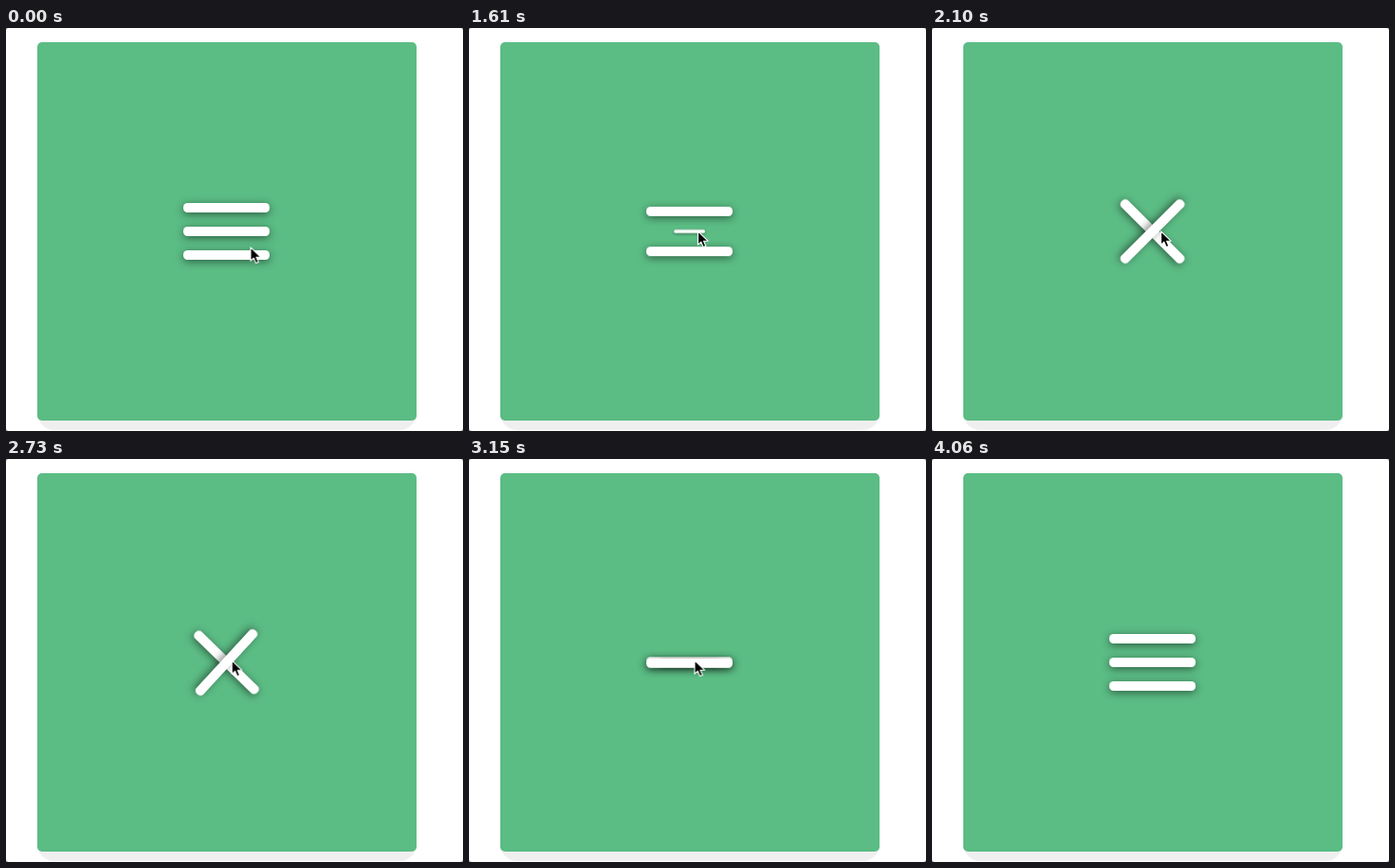
Recreate the animation shown at these times as an HTML page. Size 482 px wide and 426 px high, loop 4.27 s.

```html
<!DOCTYPE html>
<html lang="en">
<head>
<meta charset="utf-8">
<title>Menu icon</title>
<style>
  html, body { margin: 0; width: 100%; height: 100%; overflow: hidden; background: #8a8a8a; }
  .stage { position: relative; width: 482px; height: 426px; overflow: hidden; background: #fff; border-radius: 3px; }
  .stage > * { position: absolute; }
  .base { left: 32.5px; top: 385px; width: 400px; height: 40px; border-radius: 18px; background: #efefef; }
  .card { left: 32.5px; top: 15px; width: 400px; height: 400px; border-radius: 5px; background: #5bbc84; }
  .bar {
    left: 187px; width: 91px; height: 10px; border-radius: 4.5px;
    background: #fff; box-shadow: 0 2px 8px rgba(0, 0, 0, .5);
  }
  .bar, .cursor { animation: 4270ms ease-in-out infinite paused; }
  .top { top: 185px; --shift: 25px; --turn: 45deg; animation-name: cross; }
  .middle { top: 210px; animation-name: shrink; }
  .bottom { top: 235px; --shift: -25px; --turn: 135deg; animation-name: cross; }
  .cursor { left: 0; top: 0; overflow: visible; animation-name: point; }

  @keyframes cross {
    0% { transform: translateY(0) rotate(0deg); }
    34.66% { transform: translateY(0) rotate(0deg); animation-timing-function: cubic-bezier(.7, 0, .6, 1); }
    42.39% { transform: translateY(var(--shift)) rotate(0deg); }
    48.71%, 63% { transform: translateY(var(--shift)) rotate(var(--turn)); }
    72.83% { transform: translateY(var(--shift)) rotate(0deg); }
    80.21%, 100% { transform: translateY(0) rotate(0deg); }
  }
  @keyframes shrink {
    0%, 30.68% { transform: scale(1); }
    42.74% { transform: scale(0); }
    63% { transform: scale(0); animation-timing-function: cubic-bezier(.33, .3, .67, .85); }
    80.33%, 100% { transform: scale(1); }
  }
  @keyframes point {
    0% { transform: translate(257.5px, 231px); animation-timing-function: step-end; }
    22.95% { transform: translate(246px, 225px); animation-timing-function: step-end; }
    24.59%, 55.74% { transform: translate(241px, 214px); }
    65.57%, 80.8% { transform: translate(237.5px, 212px); }
    93.44% { transform: translate(239.5px, 414px); animation-timing-function: step-end; }
    95.08%, 100% { transform: translate(239.5px, 440px); }
  }
</style>
</head>
<body>
<div class="stage">
  <div class="base"></div>
  <div class="card"></div>
  <div class="bar top"></div>
  <div class="bar middle"></div>
  <div class="bar bottom"></div>
  <svg class="cursor" width="14" height="20">
    <path d="M.5 .8V15.2L3.8 12.2 6.1 17.6 8.8 16.5 6.5 11.2H11Z" fill="#000" stroke="#fff" stroke-width="1.1" stroke-linejoin="round"/>
  </svg>
</div>
<script>
  const LOOP = 4270, STEP = 70;
  const animations = document.getAnimations();
  const start = performance.now();

  function draw() {
    const elapsed = (performance.now() - start) % LOOP;
    const time = Math.floor(elapsed / STEP) * STEP;
    for (const animation of animations) animation.currentTime = time;
    requestAnimationFrame(draw);
  }
  draw();
</script>
</body>
</html>
```
